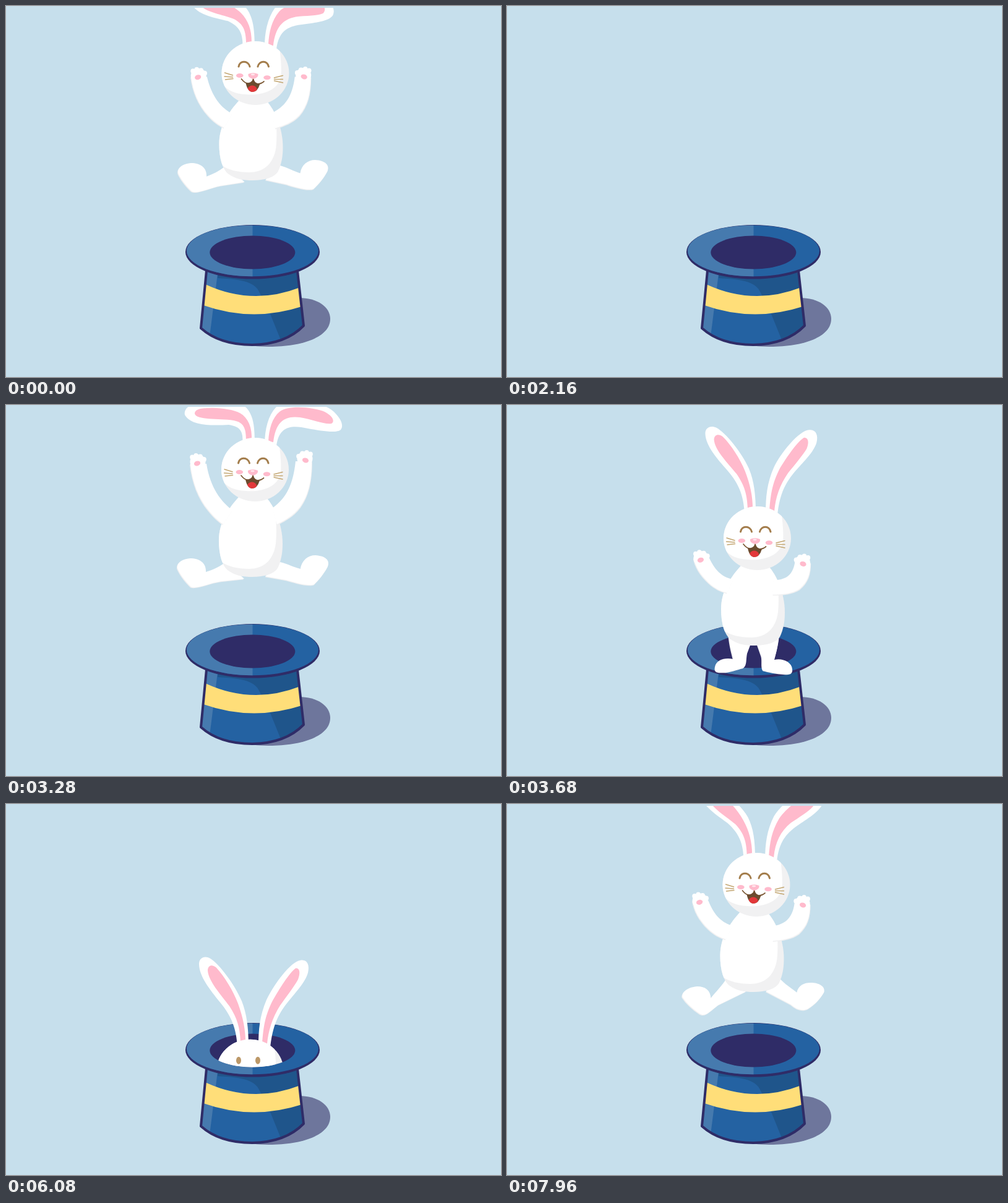
These frames come from a looping animation (800 px wide and 600 px high, 8 s). An HTML page with a canvas:

```html
<!DOCTYPE html>
<html lang="en">
<head>
<meta charset="utf-8">
<title>Rabbit in a hat</title>
<style>
html, body { margin: 0; width: 100%; height: 100%; overflow: hidden; background: #c6dfec; }
canvas { display: block; width: 100%; height: 100%; }
</style>
</head>
<body>
<canvas id="stage" width="800" height="600"></canvas>
<script>
const LOOP = 8000, CYCLE = 5000, STEP = 40;
const ctx = document.getElementById('stage').getContext('2d');
const BG = '#c6dfec', NAVY = '#2f2c67', BLUE = '#2462a2', LIGHT = '#467aae', DARK = '#1f558b';
const WHITE = '#ffffff', SHADE = '#f1f1f2', PINK = '#ffbacc', BROWN = '#a37d4c';

// Motion tracks: [ms, value] within one cycle
const track = {
  y: [[40, 0], [120, 10], [500, 402], [580, 402], [960, 215], [1200, 219], [1560, 222], [1640, 229],
      [1680, 239], [1720, 280], [1800, 402], [2120, 402], [2320, 248], [2400, 232], [2520, 236],
      [2680, 30], [2720, 26], [2800, 32], [2840, 12], [2880, -22], [2920, -55], [2960, -85],
      [3000, -107], [3140, -131], [3280, -111], [3500, -6], [3560, 2], [3640, 0]],
  x: [[40, 0], [500, -10], [2400, -10], [2720, -4], [2960, -1.5], [3280, -2], [3600, 0]],
  ear: [[2800, 0], [2960, .3], [3000, .7], [3140, .95], [3280, 1], [3360, 1.02], [3540, .1],
        [3620, 0], [3700, .06], [3800, 0]],
  arm: [[2800, 0], [2960, .2], [3000, .65], [3200, 1], [3300, 1], [3520, .25], [3800, 0]],
  leg: [[520, 0], [640, .9], [2720, .9], [2960, 1], [3000, 1.9], [3060, 2], [3280, 2], [3360, 1.5],
        [3500, .3], [3580, 0]]
};

// Each limb lists its poses; all poses of a limb share one structure
const earL = [
  'M384 175C382 148 376 128 356 104C340 84 322 62 322 42C322 32 331 28 340 33C355 42 380 76 391 102C399 122 402 145 402 175Z',
  'M384 175C386 155 382 146 362 143C337 144 302 146 291 127C289 118 298 110 310 108C332 104 372 102 390 115C402 128 404 145 404 175Z'];
const earLin = [
  'M389 168C388 145 384 130 371 110C357 91 337 70 336 52C337 43 344 43 350 48C363 62 377 85 385 106C393 128 397 148 397 168Z',
  'M390 168C390 148 386 139 370 136C345 132 310 136 307 125C307 117 320 116 330 116C350 115 370 119 380 124C394 132 400 148 399 168Z'];
const earR = [
  'M418 175C418 148 420 126 431 100C443 75 470 38 486 36C497 34 501 44 498 56C494 72 476 90 462 108C447 128 440 148 437 178Z',
  'M420 175C420 150 426 128 438 115C452 102 512 102 532 122C544 134 548 144 543 151C536 157 512 153 490 149C467 144 443 142 439 178Z'];
const earRin = [
  'M424 170C426 145 428 128 440 103C452 82 468 56 478 49C485 48 486 57 482 67C476 78 463 95 453 109C440 130 434 150 432 171Z',
  'M426 170C427 150 432 132 444 122C457 110 502 115 517 122C532 130 533 138 528 141C517 143 497 134 477 131C452 128 438 138 434 171Z'];
const armL = [
  'M366 282C350 280 338 272 327 250L302 250C304 262 312 275 326 288C336 297 345 301 356 304Z',
  'M368 281C350 268 332 245 326 206L300 206C303 235 313 262 330 282C338 292 345 298 353 304Z'];
const armR = [
  'M430 284C448 284 461 280 465 258L490 258C490 275 486 288 472 299C460 306 445 307 428 307Z',
  'M432 278C455 262 466 240 470 202L496 202C496 235 490 258 477 276C466 290 455 296 440 304Z'];
const legL = [
  'M358 368C360 390 364 402 366 411C352 408 339 412 337 422C335 430 339 432 346 432C360 433 372 427 382 425C388 421 386 412 388 402L394 386Z',
  'M356 368C348 380 338 390 331 399C330 386 322 380 309 380C295 381 284 388 285 397C292 408 303 417 313 424C322 430 330 420 343 410L388 388Z',
  'M357 365C345 374 335 378 325 381C326 366 314 359 300 359C285 360 276 368 280 377C285 388 294 398 301 405C310 409 330 399 350 396L387 392Z'];
const legR = [
  'M440 372C438 392 434 404 432 412C446 409 460 416 461 427C462 434 458 435 450 435C434 434 422 431 414 429C410 424 413 414 411 406L404 386Z',
  'M441 366C450 376 460 382 470 390C472 378 482 374 492 374C506 374 516 380 514 389C508 400 498 410 488 416C478 421 468 416 460 409L420 388Z',
  'M445 365C458 368 468 374 478 376C480 362 490 354 502 354C518 355 526 362 522 372C516 384 507 394 500 401C492 405 465 397 455 394L421 388Z'];
const BODY = 'M378 260C362 278 346 300 346 330C346 355 352 371 360 378C372 387 385 389 400 389C420 389 435 384 441 375C447 362 449 350 449 335C449 305 436 275 422 260Z';
const BODY_LIT = 'M330 250H434Q441 305 438 335C434 365 415 376 395 376C375 376 362 372 350 365H330Z';
const HEAD_LIT = 'M340 150H440Q448 200 446 220C442 246 410 252 390 250C370 249 358 243 348 230V150Z';
const CROWN = 'M324 428L315 521Q345 548 398 548Q452 547 481 517L471 428Z';

// Monotone cubic through the keys, flat at turning points
function at(keys, t) {
  const n = keys.length - 1;
  if (t <= keys[0][0]) return keys[0][1];
  if (t >= keys[n][0]) return keys[n][1];
  let i = 0;
  while (t > keys[i + 1][0]) i++;
  const rise = k => (keys[k + 1][1] - keys[k][1]) / (keys[k + 1][0] - keys[k][0]);
  const slope = k => {
    if (k === 0 || k === n) return 0;
    const a = rise(k - 1), b = rise(k);
    return a * b > 0 ? 2 * a * b / (a + b) : 0;
  };
  const [t0, v0] = keys[i], [t1, v1] = keys[i + 1];
  const h = t1 - t0, u = (t - t0) / h, w = 1 - u;
  return w * w * ((1 + 2 * u) * v0 + u * h * slope(i)) + u * u * ((1 + 2 * w) * v1 - w * h * slope(i + 1));
}

const lerp = (a, b, f) => a + (b - a) * f;

function pose(list, f) {
  const i = Math.min(Math.floor(f), list.length - 2);
  const next = list[i + 1].match(/[\d.]+/g);
  let k = 0;
  return list[i].replace(/[\d.]+/g, v => lerp(+v, +next[k++], f - i).toFixed(2));
}

function fill(d, color) {
  ctx.fillStyle = color;
  ctx.fill(new Path2D(d));
}

function line(d, color, width) {
  ctx.strokeStyle = color;
  ctx.lineWidth = width;
  ctx.stroke(new Path2D(d));
}

function oval(x, y, rx, ry, color, turn = 0) {
  ctx.beginPath();
  ctx.ellipse(x, y, rx, ry, turn, 0, 2 * Math.PI);
  ctx.fillStyle = color;
  ctx.fill();
}

function within(d, draw) {
  ctx.save();
  ctx.clip(new Path2D(d));
  draw();
  ctx.restore();
}

function shaded(d, dx, dy) {
  ctx.save();
  ctx.translate(dx, dy);
  fill(d, SHADE);
  ctx.restore();
  fill(d, WHITE);
}

function hat() {
  fill('M470 472C502 471 524 486 524 506C524 535 480 551 425 551Q405 551 388 548Z', '#6e769c');
  fill(CROWN, BLUE);
  within(CROWN, () => {
    fill('M342 425V440C375 442 402 444 410 464L427 498L446 545H490V425Z', DARK);
    fill('M310 425H343L329 535H310Z', LIGHT);
    fill('M323 450.500Q398 485 474 455.500L478 486Q398 512 319 484Z', '#ffde79');
  });
  line(CROWN, NAVY, 4);
  oval(398.5, 397.8, 108.5, 43.7, NAVY);
  const brim = 'M292 396A106.500 41.300 0 0 1 505 396A106.500 41.300 0 0 1 292 396Z';
  fill(brim, BLUE);
  within(brim, () => {
    ctx.fillStyle = LIGHT;
    ctx.fillRect(280, 345, 118.5, 100);
  });
  oval(398.3, 398.5, 69, 27, NAVY);
}

function hand(x, y, side) {
  oval(x, y, 12.5, 12, WHITE);
  for (const [dx, dy] of [[-9, -7.5], [-3, -10], [4, -8.5], [10, -4]]) oval(x + dx * side, y + dy, 3.8, 4, WHITE);
  oval(x - side, y + 2.5, 5.2, 3.9, PINK, -.3 * side);
}

function face(peeking) {
  if (peeking) {
    oval(386, 198, 4, 6, '#bc9868');
    oval(417, 198, 4, 6, '#bc9868');
  } else {
    line('M377.500 205C379 194.500 393 194.500 395.500 205', BROWN, 3);
    line('M408.500 205C411 194.500 424 194.500 426 205', BROWN, 3);
  }
  oval(379.3, 219.5, 5.8, 3.5, PINK);
  oval(423.5, 222.7, 5.8, 3.5, PINK);
  line('M355 215L368 219M354.500 221L368 222M356 226L368.500 224.500M435 223L449 219.500M435 225.500L449 225.500M435 228L449 231', '#c3a672', 1.4);
  line('M382 225Q389 234 396 232Q401 230 401 224Q402 232 408 233Q414 233 418.500 229', '#7a5733', 1.7);
  const mouth = 'M389 231.500Q397 232 401 226Q405 233 412 233Q408 246 400 246Q392 246 389 231.500Z';
  fill(mouth, '#6b4b2e');
  within(mouth, () => oval(399.5, 242, 7.5, 6.5, '#e2383a'));
  fill('M393 217Q401 213.500 409 217Q410 223 401 225Q392 223 393 217Z', PINK);
  oval(400.5, 217.8, 3, 1.5, '#ffe6ec');
}

function rabbit(t) {
  const ear = at(track.ear, t), arm = at(track.arm, t), leg = at(track.leg, t);
  ctx.save();
  if (t > 80 && t < 2900) {
    ctx.clip(new Path2D('M0 0H800V398.500H467.300A69 27 0 0 1 329.300 398.500H0Z'));
  }
  ctx.translate(at(track.x, t), at(track.y, t));
  shaded(pose(legL, leg), -1, 1.2);
  shaded(pose(legR, leg), -.5, 1.2);
  fill(BODY, SHADE);
  within(BODY, () => fill(BODY_LIT, WHITE));
  shaded(pose(armL, arm), -1, 1.2);
  shaded(pose(armR, arm), .8, 1.5);
  hand(lerp(314, 312, arm), lerp(251, 203, arm), 1);
  hand(lerp(477, 485, arm), lerp(258, 198, arm), -1);
  fill(pose(earL, ear), WHITE);
  fill(pose(earR, ear), WHITE);
  fill(pose(earLin, ear), PINK);
  fill(pose(earRin, ear), PINK);
  oval(404.5, 215.5, 54.5, 51.5, SHADE);
  within('M350 215.500A54.500 51.500 0 0 1 459 215.500A54.500 51.500 0 0 1 350 215.500Z', () => fill(HEAD_LIT, WHITE));
  face(t > 540 && t < 2000);
  ctx.restore();
}

function draw(ms) {
  const t = Math.floor(ms % LOOP / STEP) * STEP;
  ctx.fillStyle = BG;
  ctx.fillRect(0, 0, 800, 600);
  hat();
  // The loop opens in mid-leap, then cuts to the standing pose
  rabbit(t < STEP ? 3000 : t % CYCLE);
  ctx.fillStyle = BG;
  ctx.fillRect(0, 0, 800, 3);
}

ctx.lineCap = ctx.lineJoin = 'round';
let start;
function tick(now) {
  start ??= now;
  draw(now - start);
  requestAnimationFrame(tick);
}
draw(0);
requestAnimationFrame(tick);
</script>
</body>
</html>
```
